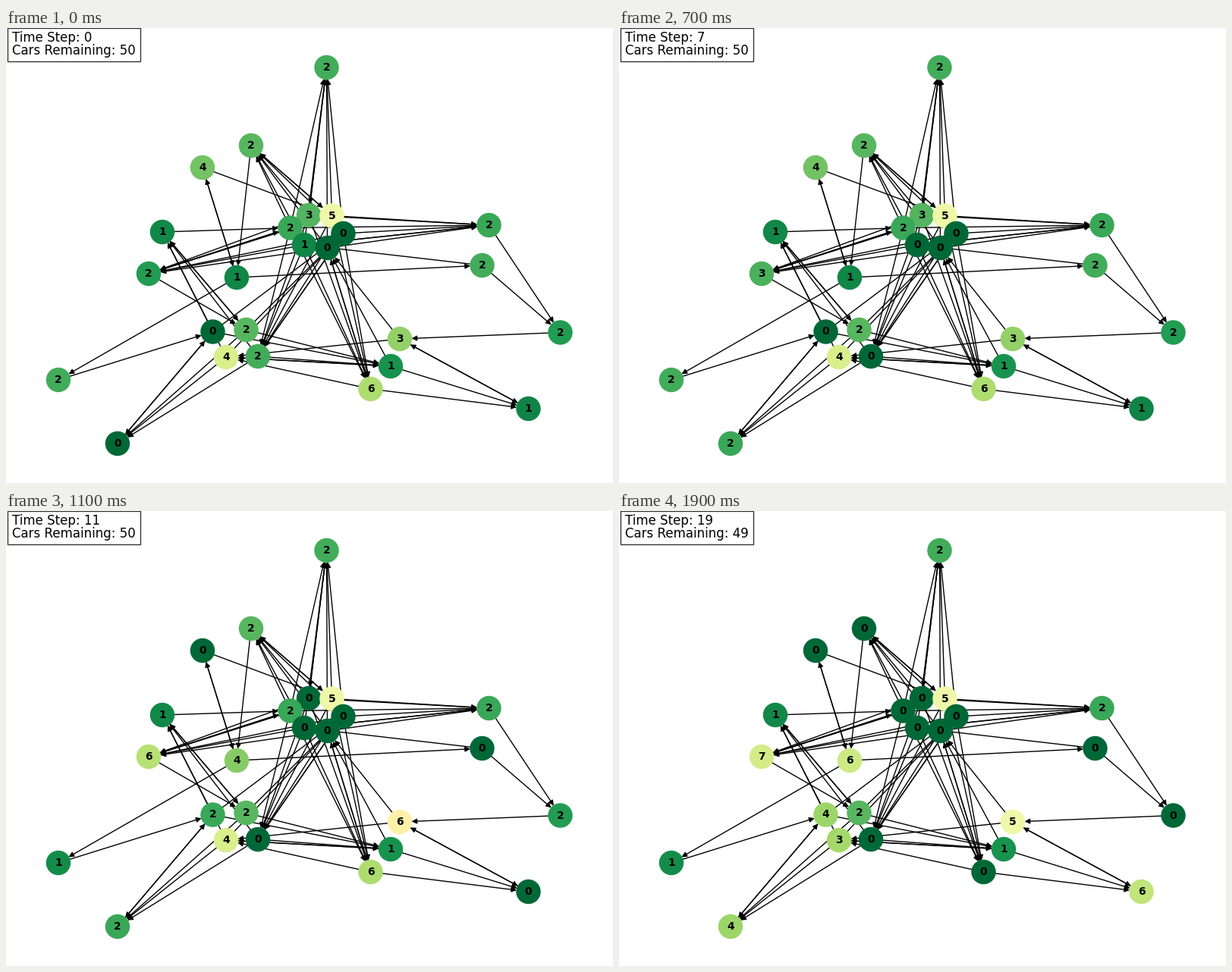
Recreate the animation shown at these times as a matplotlib script. Size 800 by 600 pixels, loop 2 s.

```python
import numpy as np
import matplotlib.pyplot as plt
from matplotlib.animation import FuncAnimation
from matplotlib.patches import FancyArrowPatch, Rectangle

W, H, DPI = 800, 600, 100
STEPS, STEP_MS = 20, 100
NODE_SIZE = 500

# name: (x, y, capacity, cars at the start)
NODES = {
    "A": (422.5, 52, 13, 2), "B": (323, 155, 11, 2), "C": (259, 184, 18, 4),
    "D": (399, 247, 17, 3), "E": (429.5, 247.5, 11, 5), "F": (374.5, 263.5, 14, 2),
    "G": (444.5, 271, 12, 0), "H": (393, 286, 16, 1), "I": (423.5, 290, 12, 0),
    "J": (206, 269, 15, 1), "K": (188, 324, 18, 2), "L": (304, 329, 16, 1),
    "M": (636.5, 260, 14, 2), "N": (627.5, 313, 13, 2), "O": (730.5, 401.5, 18, 2),
    "P": (272.5, 400.5, 14, 0), "Q": (316.5, 398, 11, 2), "R": (290, 434, 10, 4),
    "S": (332, 433, 13, 2), "T": (519, 410, 11, 3), "U": (507, 446, 11, 1),
    "V": (480.5, 476, 19, 6), "W": (69, 464, 13, 2), "X": (147, 548, 14, 0),
    "Y": (688.5, 502, 17, 1),
}

# every road of the left group leads to every road of the right group
JUNCTIONS = [
    ("DEFGHI", "ABKMSV"), ("PQRS", "GJUX"), ("TUV", "IRY"), ("JK", "FQ"),
    ("BC", "EL"), ("MN", "HO"), ("L", "CNW"), ("OY", "T"), ("WX", "P"), ("A", "D"),
]

# (step, from, to, cars); an empty destination means the car has arrived
MOVES = [
    (6, "H", "K", 1), (7, "S", "X", 2), (8, "W", "P", 2),
    (10, "C", "L", 4), (10, "N", "O", 2),
    (11, "D", "K", 3), (11, "L", "W", 1), (11, "O", "T", 2), (11, "Y", "T", 1),
    (12, "T", "R", 3),
    (13, "R", "X", 4), (13, "B", "L", 2), (13, "F", "K", 1), (13, "F", "", 1),
    (15, "X", "P", 2), (18, "V", "Y", 6), (19, "O", "T", 2),
]


def cars_at(step):
    cars = {name: node[3] for name, node in NODES.items()}
    for when, src, dst, n in MOVES:
        if when <= step:
            cars[src] -= n
            if dst:
                cars[dst] += n
    return cars


fig = plt.figure(figsize=(W / DPI, H / DPI), dpi=DPI, facecolor="white")
ax = fig.add_axes([0, 0, 1, 1])
ax.set_xlim(0, W)
ax.set_ylim(H, 0)
ax.axis("off")

pos = {name: node[:2] for name, node in NODES.items()}
capacity = np.array([node[2] for node in NODES.values()])
gap = NODE_SIZE ** 0.5 / 2
for sources, sinks in JUNCTIONS:
    for a in sources:
        for b in sinks:
            ax.add_patch(FancyArrowPatch(
                pos[a], pos[b], arrowstyle="-|>", mutation_scale=10, lw=1,
                color="black", shrinkA=gap, shrinkB=gap, zorder=1))

xs, ys = zip(*pos.values())
dots = ax.scatter(xs, ys, s=NODE_SIZE, c=np.zeros(len(pos)), cmap="RdYlGn_r",
                  vmin=0, vmax=1, zorder=2)
labels = [ax.text(x, y, "", size=10, weight="bold", family="DejaVu Sans",
                  ha="center", va="center", zorder=3) for x, y in pos.values()]

ax.add_patch(Rectangle((2.4, 0.4), 175, 43.8, fc="white", ec="black", lw=1,
                       alpha=0.8, zorder=4))
info = [ax.text(8, y, "", size=12, family="DejaVu Sans", va="baseline", zorder=5)
        for y in (18, 35)]


def update(step):
    cars = np.array(list(cars_at(step).values()))
    dots.set_array(cars / capacity)
    for label, n in zip(labels, cars):
        label.set_text(str(n))
    info[0].set_text(f"Time Step: {step}")
    info[1].set_text(f"Cars Remaining: {cars.sum()}")
    return [dots, *labels, *info]


anim = FuncAnimation(fig, update, frames=STEPS, interval=STEP_MS,
                     repeat=True, repeat_delay=0, blit=False)
plt.show()
```
